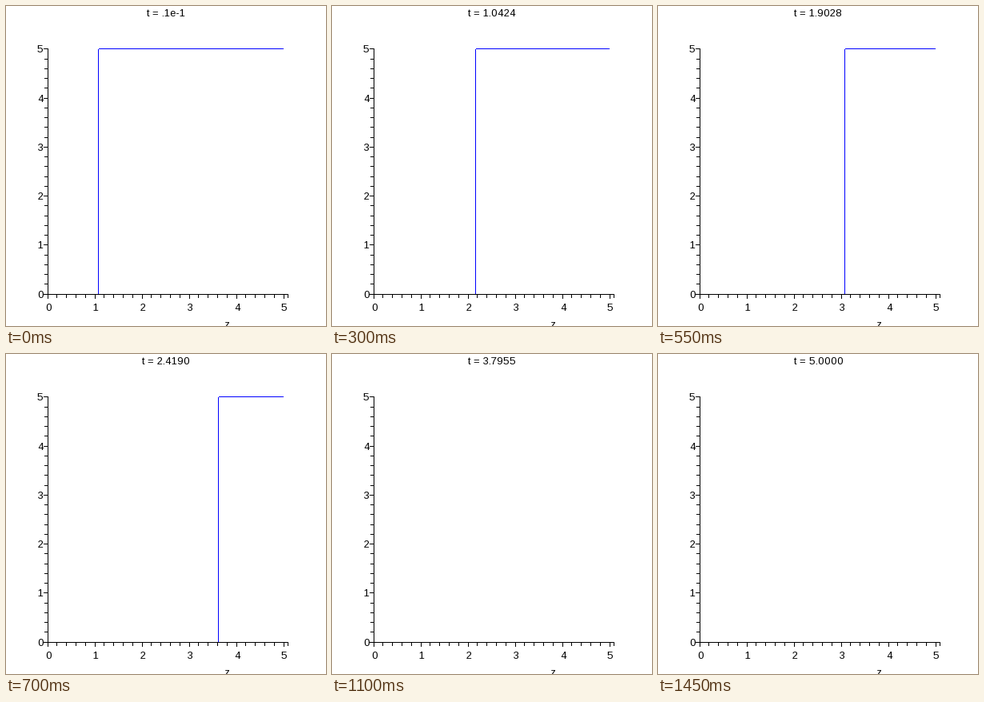
Write a matplotlib script that moves like this. It is 400 px wide and 400 px high and loops after 1.5 s.

```python
import math

import matplotlib.pyplot as plt
from matplotlib.animation import FuncAnimation
from matplotlib.patches import Rectangle

SIZE, DPI = 400, 100
FRAMES, INTERVAL = 30, 50
X0, Y0 = 52, 360             # pixel of the axes' crossing
UNIT_X, UNIT_Y = 59, 61.23   # pixels per unit
RIGHT, TOP = 347, 53
MAJOR, MINOR = 5, 4          # tick lengths
T_START, T_END = 0.01, 5.0
FRONT_START, FRONT_STEP = 115, 10.72

plt.rcParams.update({
    "font.family": "Liberation Sans",
    "font.size": 13 * 72 / DPI,
    "text.hinting": "force_autohint",
    "text.hinting_factor": 1,
})

fig = plt.figure(figsize=(SIZE / DPI, SIZE / DPI), dpi=DPI, facecolor="white")
ax = fig.add_axes([0, 0, 1, 1])
ax.set_xlim(0, SIZE)
ax.set_ylim(SIZE, 0)
ax.axis("off")


def bar(x, y, w, h, color="black"):
    """Crisp rectangle aligned to whole pixels."""
    return ax.add_patch(Rectangle((x, y), w, h, fc=color, lw=0, antialiased=False))


def label(x, baseline, text):
    return ax.text(x, baseline, text, ha="center", va="baseline")


def draw_axes():
    bar(X0, TOP, 1, Y0 - TOP + 1)
    bar(X0, Y0, 301, 1)
    bar(352, Y0 + 1, 1, MINOR)
    for i in range(26):
        major = i % 5 == 0
        length = MAJOR if major else MINOR
        x = math.floor(X0 + i * UNIT_X / 5)
        y = math.floor(Y0 - i * UNIT_Y / 5)
        bar(x, Y0 + 1, 1, length)
        bar(X0 - length, y, length, 1)
        if major:
            label(x + 1, 381, str(i // 5))
            label(43, y + 5, str(i // 5))
    label(277, 402, "z")


def time_text(t):
    if t < 0.1:
        return "t = .1e-1"
    if t < 1:
        return "t = " + f"{t:.5f}"[1:]
    return f"t = {t:.4f}"


draw_axes()
title = label(200.5, 13, "")
wall = bar(0, TOP + 1, 1, Y0 - TOP - 1, "blue")
plateau = bar(0, TOP, 1, 1, "blue")


def update(k):
    t = T_START + (T_END - T_START) * k / (FRAMES - 1)
    title.set_text(time_text(t))
    x = round(FRONT_START + FRONT_STEP * k)
    visible = x < RIGHT
    wall.set_visible(visible)
    plateau.set_visible(visible)
    wall.set_x(x)
    plateau.set_x(x + 1)
    plateau.set_width(max(RIGHT - x - 1, 0))
    return title, wall, plateau


anim = FuncAnimation(fig, update, frames=FRAMES, interval=INTERVAL,
                     repeat=True, repeat_delay=0, blit=False)
plt.show()
```
